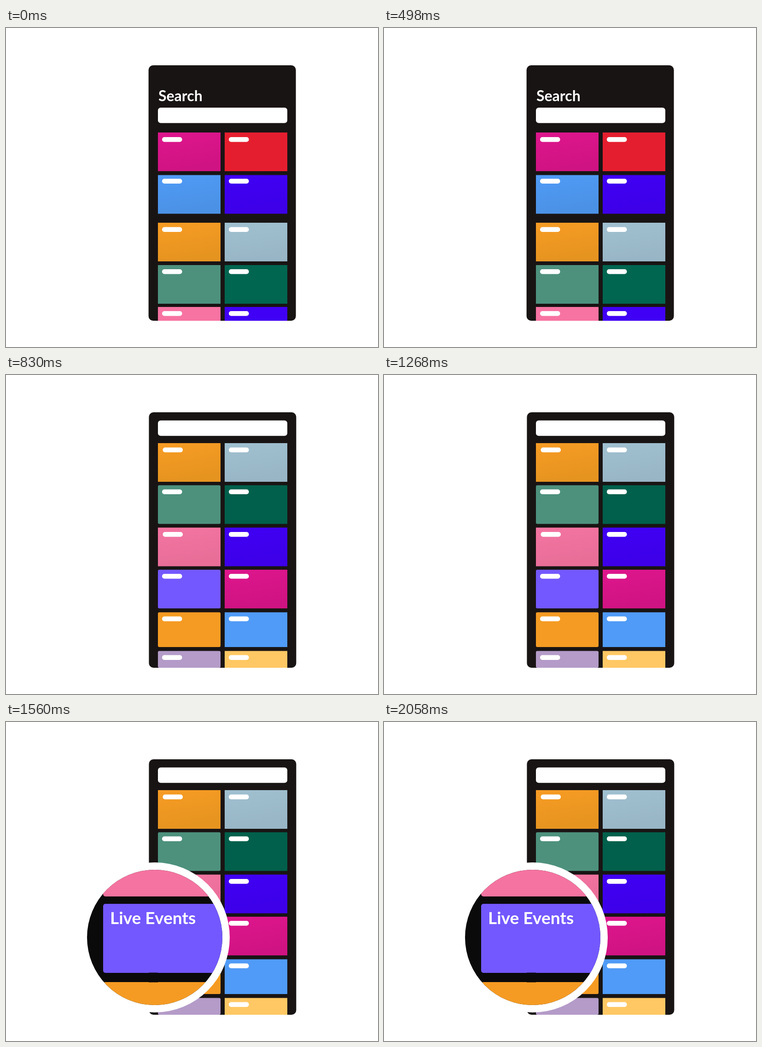
An HTML page with a canvas that plays this animation: 808 by 693 pixels, repeating every 2390 ms.

```html
<!DOCTYPE html>
<html lang="en">
<head>
<meta charset="utf-8">
<title>Search screen</title>
<style>
  html, body { margin: 0; width: 100%; height: 100%; overflow: hidden; background: #fff; }
  canvas { display: block; }
</style>
</head>
<body>
<canvas id="stage" width="808" height="693"></canvas>
<script>
const ctx = document.getElementById('stage').getContext('2d');
const LOOP = 2390, SCROLLED_AT = 830, ZOOMED_AT = 1560;
const BOTTOM = 636, COLUMNS = [330, 475];

const MAGENTA = ['#de168d', '#d01382'], ORANGE = ['#f79c24', '#e69420'];
const MIST = ['#a0c0d0', '#98b6c6'], ROSE = ['#f474a1', '#e86e98'];
const SKY = ['#509bf7', '#4b92e6'], VIOLET = ['#4000f5', '#3d00e8'];
const PINE = ['#006650', '#00604b'];

// Each row: top, height, label top, left colour, right colour.
const topRows = [
  [227, 84, 237, MAGENTA, '#e51e2f'],
  [319.5, 84, 327.5, SKY, VIOLET],
  [423, 84, 432.5, ORANGE, MIST],
  [515, 84, 524, '#4d917d', '#006650'],
  [606, 84, 615, '#f773a2', '#4000f5']
];
const scrolledRows = [
  [148, 84, 157.5, ORANGE, MIST],
  [239.5, 84, 248.5, '#4d917d', '#00604b'],
  [331.5, 84, 341, ROSE, VIOLET],
  [423, 84, 432, '#7358ff', MAGENTA],
  [515.5, 75.5, 524.5, '#f59b23', '#509bf7'],
  [599.5, 84, 608.5, '#b49bc8', '#ffc864']
];

function box(x, y, w, h, r, fill) {
  ctx.fillStyle = fill;
  ctx.beginPath();
  ctx.roundRect(x, y, w, h, r);
  ctx.fill();
}

function disc(r, fill) {
  ctx.beginPath();
  ctx.arc(323, 468, r, 0, Math.PI * 2);
  ctx.fillStyle = fill;
  ctx.fill();
}

function label(text, x, y, size) {
  ctx.font = `bold ${size}px Lato, sans-serif`;
  ctx.fillStyle = '#fff';
  ctx.fillText(text, x, y);
}

function shade(color, x, y, h) {
  if (typeof color === 'string') return color;
  const g = ctx.createLinearGradient(x, y, x + 14, y + h);
  color.forEach((c, i) => g.addColorStop(i, c));
  return g;
}

function card(x, y, h, labelY, color, scrolled) {
  const left = x === COLUMNS[0], flat = typeof color === 'string';
  const visible = Math.min(h, BOTTOM - y);
  box(x, y, 136, visible, scrolled && left && flat ? 3 : 0, shade(color, x, y, h));
  const inset = scrolled && left && !flat ? 10.5 : 9;
  box(x + inset, labelY, 43.5, 10.5, 5, '#fff');
}

function phone(scrolled) {
  box(scrolled ? 310.4 : 309.6, 81, 320, 555, 10, '#191414');
  if (!scrolled) label('Search', 331, 159, 32);
  box(330, scrolled ? 98.8 : 173, 281, 33.5, 6, '#fff');
  for (const [y, h, labelY, ...colors] of scrolled ? scrolledRows : topRows) {
    colors.forEach((color, i) => card(COLUMNS[i], y, h, labelY, color, scrolled));
  }
}

function magnifier() {
  disc(163, '#fff');
  ctx.save();
  disc(147, '#0b0a0b');
  ctx.clip();
  box(211, 300, 280, 79, 5, '#f573a0');
  box(211, 395, 280, 150, 5, '#7358ff');
  box(211, 565, 280, 80, 5, '#f59b23');
  box(310, 544.5, 20, 21, 0, '#0b0a0b');
  label('Live Events', 226, 438.5, 37);
  ctx.restore();
}

function frame(now) {
  const t = now % LOOP;
  ctx.clearRect(0, 0, 808, 693);
  phone(t >= SCROLLED_AT);
  if (t >= ZOOMED_AT) magnifier();
  requestAnimationFrame(frame);
}
frame(0);
</script>
</body>
</html>
```
